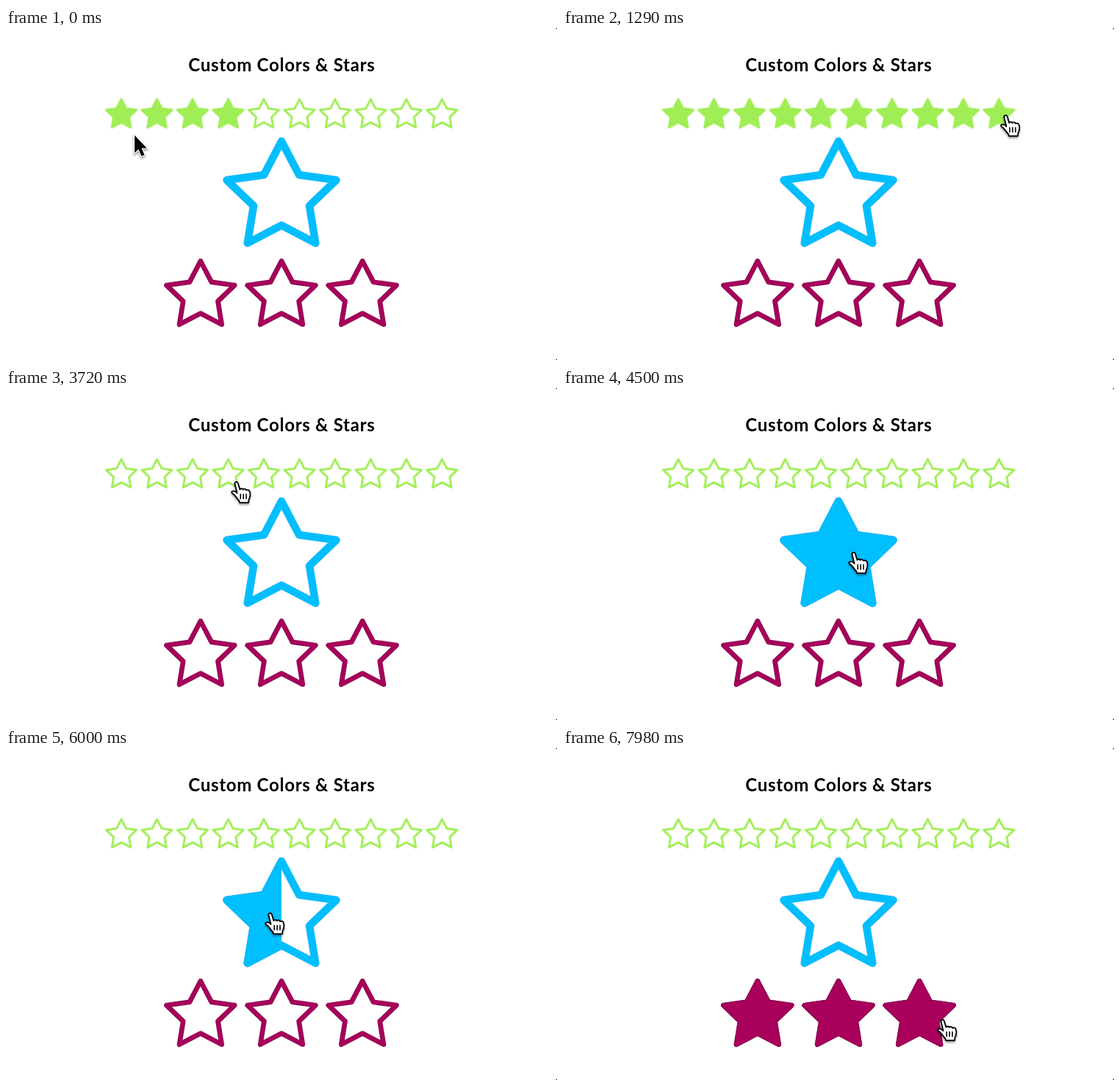
Recreate the animation shown at these times as an HTML page. Size 750 by 452 pixels, loop 8000 ms.

```html
<!DOCTYPE html>
<html lang="en">
<head>
<meta charset="utf-8">
<title>Custom Colors &amp; Stars</title>
<style>
  html, body { margin: 0; width: 100%; height: 100%; overflow: hidden; background: #fff; }
  svg { display: block; width: 750px; height: 452px; }
  text { font: 700 24px Lato, "Open Sans", sans-serif; letter-spacing: .72px; text-anchor: middle; }
  .cursor { filter: drop-shadow(0 2px 1.5px rgba(0, 0, 0, .45)); }
</style>
</head>
<body>
<svg viewBox="0 0 750 452">
  <defs>
    <path id="star" stroke-linejoin="round"
      d="M0 5 24 51 74.5 58 38 93 46.3 143.8 0 119.5 -46.3 143.8 -38 93 -74.5 58 -24 51Z"/>
  </defs>
  <path d="M748 0h2v2zM750 450v2h-2z" fill="#333"/>
  <text x="375.4" y="59">Custom Colors &amp; Stars</text>
  <g id="stars"></g>
  <g id="arrow" class="cursor">
    <path d="M0 0V24L5.4 19 9.4 28.4 13.4 26.7 9.5 17.4H16.6Z" stroke="#fff" stroke-width="2.4" paint-order="stroke"/>
  </g>
  <g id="hand" class="cursor">
    <g transform="translate(-6.8 -.8) scale(1.05)" stroke="#000" stroke-linecap="round" stroke-linejoin="round">
      <path fill="#fff" stroke-width="1.7" d="M5 3.2C4.5.5 8.2-.4 9.2 2.4L11.6 10.5C12.6 8.8 15 9 15.6 10.6
        16.8 9.2 19.2 9.6 19.8 11.4 21.4 10.2 24 11.2 24.4 13.4 25.4 17 25 20.5 23.2 23.5L22.6 27.5H11.4
        L10.8 25.4C8.5 22.8 6.5 20 4.6 17.6 3.2 16 1.2 15.4.9 14.2 1 12.2 4.4 11.6 6.8 14L8 15Z"/>
      <path fill="none" stroke-width="1.5" d="M12.4 16.5V22.5M16.1 16.5V22.5M19.8 16.5V22.5"/>
    </g>
  </g>
</svg>
<script>
const LOOP = 8000;
const SVG = "http://www.w3.org/2000/svg";
const $ = id => document.getElementById(id);

function add(parent, tag, attrs) {
  const el = document.createElementNS(SVG, tag);
  for (const key in attrs) el.setAttribute(key, attrs[key]);
  return parent.appendChild(el);
}

// One rating bar: stroked stars, each with a clipped solid copy on top.
function makeRating({ name, count, first, pitch, top, scale, color, edge, outer, inner }) {
  const fills = [];
  for (let i = 0; i < count; i++) {
    const g = add($("stars"), "g", { transform: `translate(${first + i * pitch} ${top}) scale(${scale})` });
    const clip = add(g, "clipPath", { id: name + i });
    fills.push(add(clip, "rect", { x: -90, y: -10, width: 0, height: 180 }));
    const layer = (parent, fill, stroke, width) =>
      add(parent, "use", { href: "#star", fill, stroke, "stroke-width": width });
    layer(g, "none", edge, outer);
    layer(g, "none", color, inner);
    const solid = add(g, "g", { "clip-path": `url(#${name + i})` });
    layer(solid, color, edge, outer);
    layer(solid, color, color, inner);
  }
  const left = first - pitch / 2;
  return {
    at: x => Math.max(0, Math.min(count, Math.ceil((x - left) / pitch * 2) / 2)),
    set: value => fills.forEach((rect, i) =>
      rect.setAttribute("width", 180 * Math.max(0, Math.min(1, value - i))))
  };
}

const green = makeRating({
  name: "green", count: 10, first: 157, pitch: 48.5, top: 95.6, scale: .276,
  color: "#a0ee55", edge: "#cdf6a8", outer: 13, inner: 8
});
const blue = makeRating({
  name: "blue", count: 1, first: 375, pitch: 160, top: 149.1, scale: 1,
  color: "#00bfff", edge: "#27b4ee", outer: 10.6, inner: 9
});
const plum = makeRating({
  name: "plum", count: 3, first: 264.8, pitch: 110.2, top: 314.2, scale: .622,
  color: "#a9005b", edge: "#85094c", outer: 10.8, inner: 7.8
});

// Pointer path: time, x, y
const path = [
  [0, 175, 146], [120, 171, 138], [400, 340, 122], [810, 541, 120], [1140, 607, 121],
  [1290, 602, 119], [1620, 459, 119], [1980, 313, 128], [3960, 313, 128], [4200, 345, 170],
  [4500, 395, 224], [4710, 398, 226], [5430, 398, 226], [5670, 359, 225], [6990, 359, 225],
  [7200, 240, 340], [7350, 272, 356], [7770, 395, 370], [7980, 516, 370], [8000, 516, 370]
];

// Monotone cubic interpolation, so the pointer never overshoots a stop.
const slope = (i, k) => (path[i + 1][k] - path[i][k]) / (path[i + 1][0] - path[i][0]);
function tangent(i, k) {
  if (i === 0 || i === path.length - 1) return 0;
  const a = slope(i - 1, k), b = slope(i, k);
  return a * b > 0 ? 2 * a * b / (a + b) : 0;
}
function pointer(t, k) {
  let i = 0;
  while (i < path.length - 2 && t >= path[i + 1][0]) i++;
  const p = path[i], q = path[i + 1], h = q[0] - p[0], u = (t - p[0]) / h;
  const s = u * u * (3 - 2 * u);
  return p[k] + (q[k] - p[k]) * s
    + h * u * (1 - u) * ((1 - u) * tangent(i, k) - u * tangent(i + 1, k));
}

function greenValue(t, x, over) {
  if (t < 2220) return over ? green.at(x) : 4;
  return t >= 3030 && t < 3570 ? 4 : 0;
}
function blueValue(t, x, y) {
  if (t >= 3960 && t < 5040) return y > 146 ? blue.at(x) : 0;
  return t >= 5430 && t < 6240 && x < 375 ? .5 : 0;
}
// The hover fill trails the pointer slightly here.
const plumValue = (t, x, y) => t > 6990 && y > 312 ? plum.at(x - 9) : 0;

function draw(t) {
  const x = pointer(t, 1), y = pointer(t, 2);
  const over = t > 60 && y < 142 || t > 2000;
  green.set(greenValue(t, x, over));
  blue.set(blueValue(t, x, y));
  plum.set(plumValue(t, x, y));
  for (const [id, shown] of [["arrow", !over], ["hand", over]]) {
    $(id).setAttribute("transform", `translate(${x.toFixed(2)} ${y.toFixed(2)})`);
    $(id).style.display = shown ? "" : "none";
  }
}

const start = performance.now();
function tick() {
  draw((performance.now() - start) % LOOP);
  requestAnimationFrame(tick);
}
tick();
</script>
</body>
</html>
```
